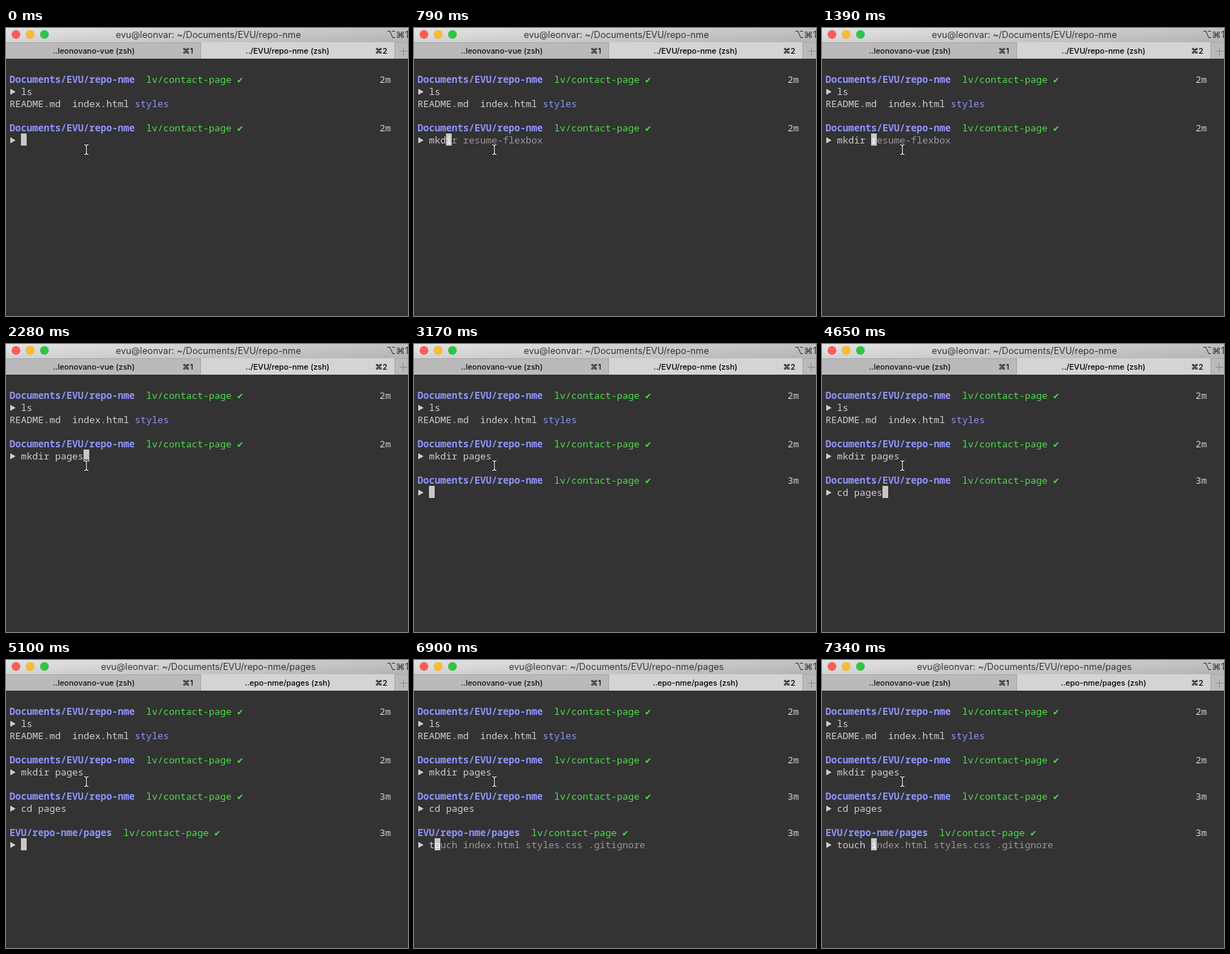
These frames come from a looping animation (565x404 px, 8 s). An HTML page with a canvas:

```html
<!DOCTYPE html>
<html lang="en">
<head>
<meta charset="utf-8">
<title>Terminal session</title>
<style>
html, body { margin: 0; width: 100%; height: 100%; overflow: hidden; background: #333; }
canvas { display: block; width: 565px; height: 404px; }
</style>
</head>
<body>
<canvas id="stage" width="565" height="404"></canvas>
<script>
const ctx = document.getElementById('stage').getContext('2d');
const W = 565, H = 404, LOOP = 8000;
const LEFT = 5, TOP = 63, CELL = 8, LINE = 17;
const MONO = '13.33px "Noto Sans Mono", "DejaVu Sans Mono", monospace';
const UI = 'Inter, "DejaVu Sans", sans-serif';
const COLOR = {
  bg: '#333333', text: '#cecece', path: '#9194ff', branch: '#4fdc4b',
  dir: '#8c97ee', ghost: '#989898', cursor: '#c7c7c7'
};
const REPO = 'Documents/EVU/repo-nme';
const PAGES = 'EVU/repo-nme/pages';
const CHANGE_DIR = 4950;

// Each step: [time, row, typed text, suggested rest]
const steps = [
  [0, 5, '', ''],
  [500, 5, 'm', 'kdir resume-flexbox'],
  [640, 5, 'mk', 'dir resume-flexbox'],
  [790, 5, 'mkd', 'ir resume-flexbox'],
  [940, 5, 'mkdi', 'r resume-flexbox'],
  [1090, 5, 'mkdir', ' resume-flexbox'],
  [1390, 5, 'mkdir ', 'resume-flexbox'],
  [1830, 5, 'mkdir pa', ''],
  [1980, 5, 'mkdir pag', ''],
  [2130, 5, 'mkdir page', ''],
  [2280, 5, 'mkdir pages', ''],
  [2870, 6, null, ''],
  [3170, 8, '', ''],
  [3770, 8, 'c', 'lear'],
  [4060, 8, 'cd ', 'projects'],
  [4210, 8, 'cd pa', 'ckage'],
  [4350, 8, 'cd pag', ''],
  [4500, 8, 'cd page', ''],
  [4650, 8, 'cd pages', ''],
  [CHANGE_DIR, 9, null, ''],
  [5100, 11, '', ''],
  [6900, 11, 't', 'ouch index.html styles.css .gitignore'],
  [7040, 11, 'tou', 'ch index.html styles.css .gitignore'],
  [7190, 11, 'touc', 'h index.html styles.css .gitignore'],
  [7340, 11, 'touch ', 'index.html styles.css .gitignore']
];

function rect(x, y, w, h, color) {
  ctx.fillStyle = color;
  ctx.fillRect(x, y, w, h);
}

function gradient(x, y, from, to) {
  const g = ctx.createLinearGradient(0, 0, x, y);
  g.addColorStop(0, from);
  g.addColorStop(1, to);
  return g;
}

function mono(str, col, row, color, weight = 500) {
  ctx.font = weight + ' ' + MONO;
  ctx.textAlign = 'left';
  ctx.fillStyle = color;
  [...str].forEach((ch, i) => ctx.fillText(ch, LEFT + (col + i) * CELL, TOP + row * LINE + 14));
}

function label(str, x, y, font, color, align) {
  ctx.font = font + ' ' + UI;
  ctx.textAlign = align;
  ctx.fillStyle = color;
  ctx.fillText(str, x, y);
}

function prompt(row, path, age) {
  const col = path.length + 2;
  mono(path, 0, row, COLOR.path, 700);
  mono('lv/contact-page ✔', col, row, COLOR.branch);
  mono(age, 65, row, COLOR.text);
}

function command(row, str) {
  const y = TOP + row * LINE;
  ctx.fillStyle = COLOR.text;
  ctx.beginPath();
  ctx.moveTo(LEFT + 1, y + 5.2);
  ctx.lineTo(LEFT + 8.5, y + 9.5);
  ctx.lineTo(LEFT + 1, y + 13.8);
  ctx.fill();
  mono(str, 2, row, COLOR.text);
}

function cursor(col, row) {
  rect(LEFT + col * CELL, TOP + row * LINE, CELL, LINE, COLOR.cursor);
}

function windowBar(inPages) {
  rect(0, 0, W, 20, gradient(0, 20, '#e4e4e4', '#d3d3d3'));
  rect(0, 0, W, 20, gradient(W, 20, 'rgba(0,0,0,0)', 'rgba(0,0,0,0.15)'));
  ['#fc5b57', '#fdbb2e', '#2bc840'].forEach((color, i) => {
    ctx.fillStyle = color;
    ctx.beginPath();
    ctx.arc(14 + i * 20, 9, 6, 0, Math.PI * 2);
    ctx.fill();
    ctx.strokeStyle = 'rgba(0,0,0,0.12)';
    ctx.lineWidth = 0.6;
    ctx.stroke();
  });
  const title = 'evu@leonvar: ~/Documents/EVU/repo-nme' + (inPages ? '/pages' : '');
  label(title, 284.4, 14, '12.7px', '#383838', 'center');
  label('⌥⌘1', 535, 14, '12.7px', '#383838', 'left');
}

function tabs(inPages) {
  rect(0, 20, W, 23, '#bababa');
  rect(274, 20, 272, 23, '#d4d4d4');
  rect(0, 20, 273, 1, '#a9a9a9');
  rect(547, 20, 18, 1, '#a9a9a9');
  rect(273, 20, 1, 23, '#a5a5a5');
  rect(546, 20, 1, 23, '#a5a5a5');
  const font = '500 10.95px';
  label('..leonovano-vue (zsh)', 123.5, 36, font, '#111', 'center');
  label('⌘1', 263, 36, font, '#111', 'right');
  label(inPages ? '..epo-nme/pages (zsh)' : '../EVU/repo-nme (zsh)', 395.7, 36, font, '#000', 'center');
  label('⌘2', 536, 36, font, '#000', 'right');
  rect(553, 32, 11, 1, '#8c8c8c');
  rect(558, 27, 1, 11, '#8c8c8c');
}

function pointer() {
  const beam = (color, width) => {
    ctx.strokeStyle = color;
    ctx.lineWidth = width;
    ctx.beginPath();
    for (const side of [-3, 3]) {
      ctx.moveTo(113 + side, 163.5);
      ctx.quadraticCurveTo(113, 163.5, 113, 166);
      ctx.lineTo(113, 175);
      ctx.quadraticCurveTo(113, 177.5, 113 + side, 177.5);
    }
    ctx.stroke();
  };
  beam('#111', 2.8);
  beam('#f0f0f0', 1.2);
}

function draw(t) {
  const [, row, typed, rest] = steps.findLast(step => step[0] <= t);
  const inPages = t >= CHANGE_DIR;
  rect(0, 0, W, H, COLOR.bg);
  windowBar(inPages);
  tabs(inPages);

  prompt(0, REPO, '2m');
  command(1, 'ls');
  mono('README.md  index.html', 0, 2, COLOR.text);
  mono('styles', 22, 2, COLOR.dir);
  prompt(4, REPO, '2m');
  if (row > 5) command(5, 'mkdir pages');
  if (row >= 8) prompt(7, REPO, '3m');
  if (row > 8) command(8, 'cd pages');
  if (row >= 11) prompt(10, PAGES, '3m');

  if (typed === null) {
    cursor(0, row);
  } else {
    const col = 2 + typed.length;
    command(row, typed);
    mono(rest.slice(1), col + 1, row, COLOR.ghost);
    cursor(col, row);
    mono(rest.slice(0, 1), col, row, '#fff');
  }
  pointer();
}

const start = performance.now();
function tick() {
  draw((performance.now() - start) % LOOP);
  requestAnimationFrame(tick);
}
tick();
</script>
</body>
</html>
```
